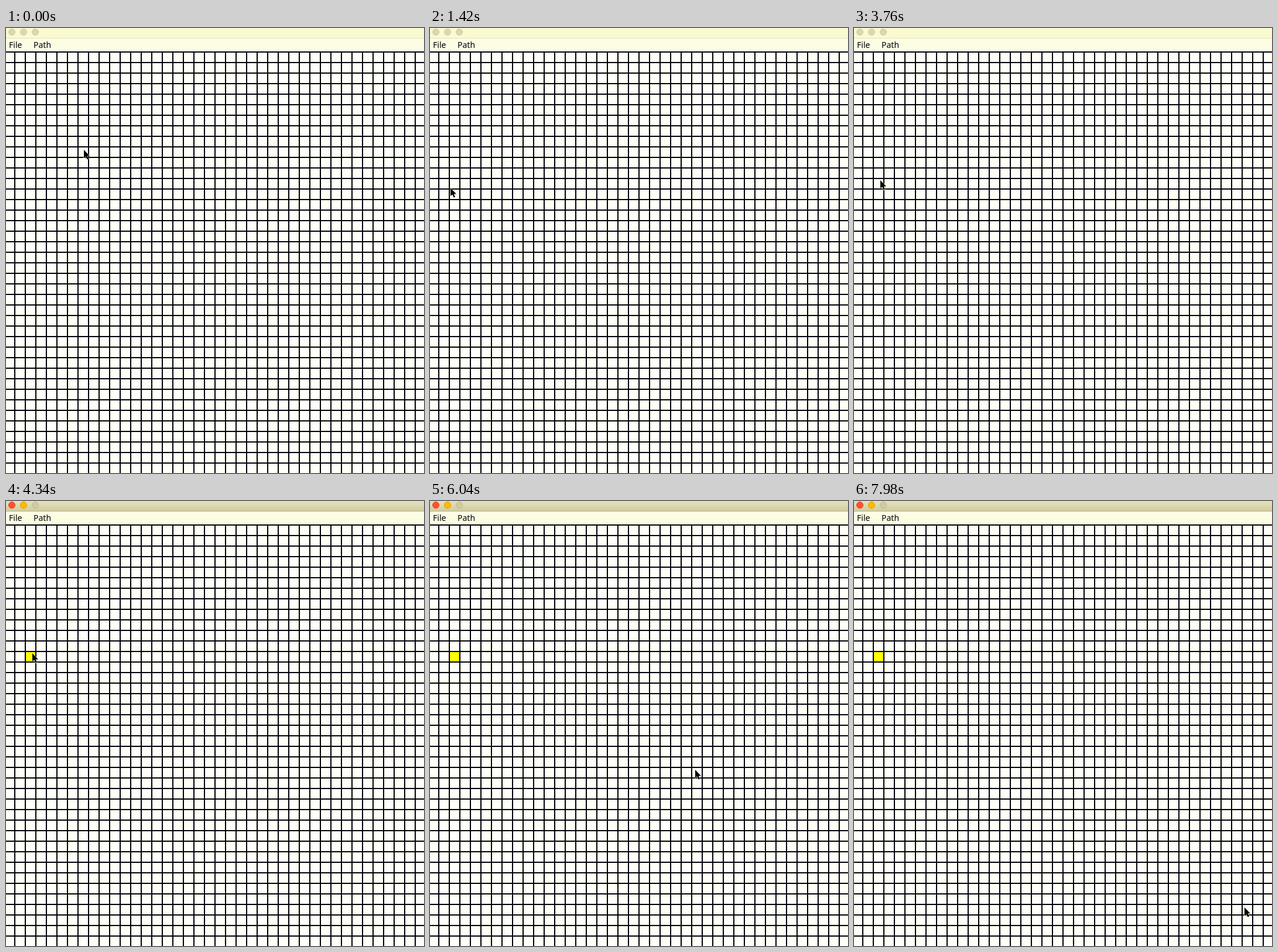
An HTML page for the animation above (8 s loop, 714 by 760 pixels).

```html
<!DOCTYPE html>
<html lang="en">
<head>
<meta charset="utf-8">
<title>Grid path</title>
<style>
html, body { margin: 0; width: 100%; height: 100%; overflow: hidden; background: #fffff8; }
svg { display: block; }
text { font: 14px "Noto Sans", "Open Sans", sans-serif; fill: #000; }
</style>
</head>
<body>
<svg width="714" height="760" viewBox="0 0 714 760">
  <defs>
    <linearGradient id="bar" x1="0" y1="0" x2="0" y2="1">
      <stop offset="0" stop-color="#e5e2bc"/>
      <stop offset="1" stop-color="#d0cca0"/>
    </linearGradient>
  </defs>
  <rect width="714" height="760" fill="#fffff8"/>
  <rect id="title" width="714" height="17"/>
  <rect id="edge" y="17" width="714" height="1"/>
  <rect y="18" width="714" height="22" fill="#fdfde4"/>
  <g id="lights"></g>
  <text x="5" y="34">File</text>
  <text x="47" y="34">Path</text>
  <rect id="cell" x="34" y="258" width="16" height="16" fill="#ff0"/>
  <path id="grid" fill="none" stroke="#000006" stroke-width="2" shape-rendering="crispEdges"/>
  <path id="cursor" d="M0 0V14L3.2 11.2L5.6 16.6L8 15.5L5.7 10.4H10Z"
    fill="#000" stroke="#ffffe0" stroke-width="1" stroke-linejoin="round" paint-order="stroke"/>
</svg>
<script>
const LOOP = 8000, STEP = 18, FOCUS_AT = 3920, MARK_AT = 4080;
const $ = id => document.getElementById(id);

// time, x, y of the pointer tip
const keys = [
  [0, 133, 208], [1200, 36, 272], [1420, 35, 273], [2200, 51, 257],
  [2400, 51, 257], [3500, 45, 260], [4480, 45, 260], [5200, 209, 332],
  [6980, 641, 600], [8000, 667, 696]
];

let lines = "";
for (let x = 15; x < 714; x += STEP) lines += `M${x} 40V760`;
for (let y = 41; y < 760; y += STEP) lines += `M0 ${y}H714`;
$("grid").setAttribute("d", lines);

const lights = [10, 30, 50].map(cx => {
  const dot = document.createElementNS("http://www.w3.org/2000/svg", "circle");
  for (const [k, v] of Object.entries({ cx, cy: 7, r: 5.5 })) dot.setAttribute(k, v);
  $("lights").append(dot);
  return dot;
});

const secant = (i, a) => (keys[i + 1][a] - keys[i][a]) / (keys[i + 1][0] - keys[i][0]);

// Harmonic mean of neighbouring slopes, so the pointer never overshoots
function slope(i, a) {
  if (i === 0) return secant(0, a);
  if (i === keys.length - 1) return secant(i - 1, a);
  const p = secant(i - 1, a), q = secant(i, a);
  return p * q > 0 ? 2 * p * q / (p + q) : 0;
}

function pointer(t, a) {
  let i = 0;
  while (i < keys.length - 2 && t >= keys[i + 1][0]) i++;
  const h = keys[i + 1][0] - keys[i][0], u = (t - keys[i][0]) / h;
  const ease = u * u * (3 - 2 * u);
  return keys[i][a] * (1 - ease) + keys[i + 1][a] * ease
    + h * u * (1 - u) * (slope(i, a) * (1 - u) - slope(i + 1, a) * u);
}

function draw(t) {
  const active = t >= FOCUS_AT;
  const colors = active ? ["#ff5030", "#ffb900", "#d0cba0"] : Array(3).fill("#dad7b2");
  const rims = active ? ["#de4429", "#dca000", "#bcb890"] : Array(3).fill("#d0cda6");
  lights.forEach((dot, i) => {
    dot.setAttribute("fill", colors[i]);
    dot.setAttribute("stroke", rims[i]);
  });
  $("title").setAttribute("fill", active ? "url(#bar)" : "#fafad0");
  $("edge").setAttribute("fill", active ? "#b8b48c" : "#e4e2c0");
  $("cell").setAttribute("visibility", t >= MARK_AT ? "visible" : "hidden");
  $("cursor").setAttribute("transform",
    `translate(${Math.round(pointer(t, 1))} ${Math.round(pointer(t, 2))})`);
}

const start = performance.now();
function tick() {
  draw((performance.now() - start) % LOOP);
  requestAnimationFrame(tick);
}
tick();
</script>
</body>
</html>
```
